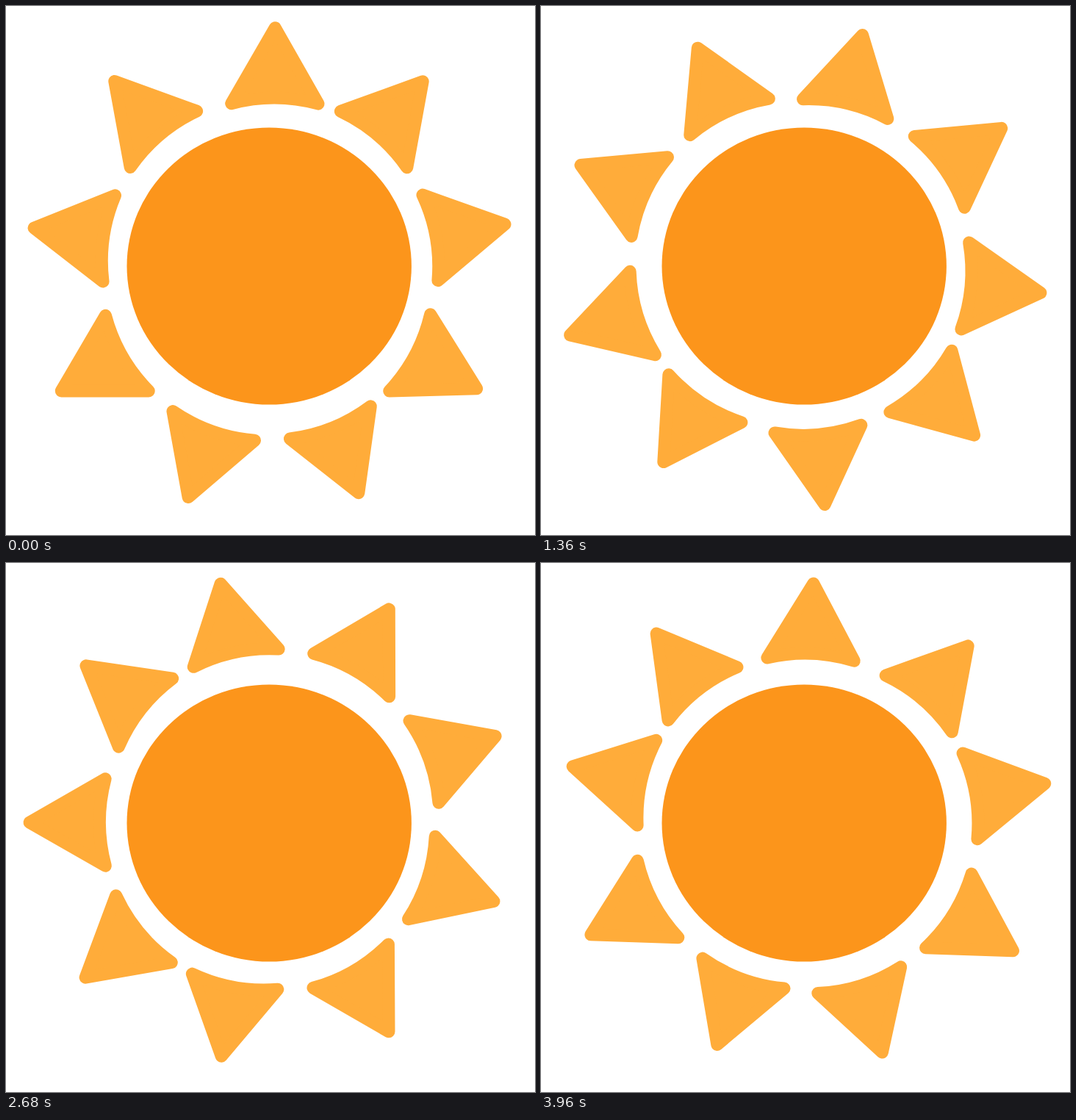
An HTML page that plays this animation: 720 px wide and 720 px high, repeating every 4 s.

```html
<!DOCTYPE html>
<html lang="en">
<head>
<meta charset="utf-8">
<title>Spinning sun</title>
<style>
  html, body { margin: 0; width: 100%; height: 100%; overflow: hidden; background: #fff; }
  svg { display: block; width: 100%; height: 100%; }
  #rays { fill: #ffac3a; stroke: #ffac3a; stroke-width: 17; stroke-linejoin: round; }
</style>
</head>
<body>
<svg viewBox="0 0 720 720">
  <g id="rays"></g>
  <ellipse cx="358.2" cy="354" rx="193.7" ry="188.5" fill="#fc951b"/>
</svg>
<script>
  const LOOP = 4000, STEP = 50, TICK = 40, DEGREES_PER_TICK = 2.88;
  const PIVOT = '358 353.7';
  const RAY = 'M0-68.8L59.2 34.4A230 230 0 0 0-59.2 34.4Z';

  // Centre x, centre y and heading of each hand-placed ray
  const placements = [
    [366, 98.5, 0.2], [522.8, 155.3, 40.2], [611.3, 309.3, 79.8],
    [580, 488.2, 118.2], [454.2, 598.8, 158.1], [271.2, 603.8, 199.6],
    [135, 489.7, 240.2], [106.2, 311.7, 278], [192.2, 155, 319.8],
  ];

  const rays = document.getElementById('rays');
  rays.innerHTML = placements.map(([x, y, heading]) =>
    `<path d="${RAY}" transform="translate(${x} ${y}) rotate(${heading})"/>`).join('');

  // The picture advances every 50 ms, showing the latest 40 ms tick of a steady spin
  function draw() {
    const shown = Math.floor(performance.now() % LOOP / STEP) * STEP;
    const angle = Math.floor(shown / TICK) * DEGREES_PER_TICK;
    rays.setAttribute('transform', `rotate(${angle} ${PIVOT})`);
    requestAnimationFrame(draw);
  }
  draw();
</script>
</body>
</html>
```
